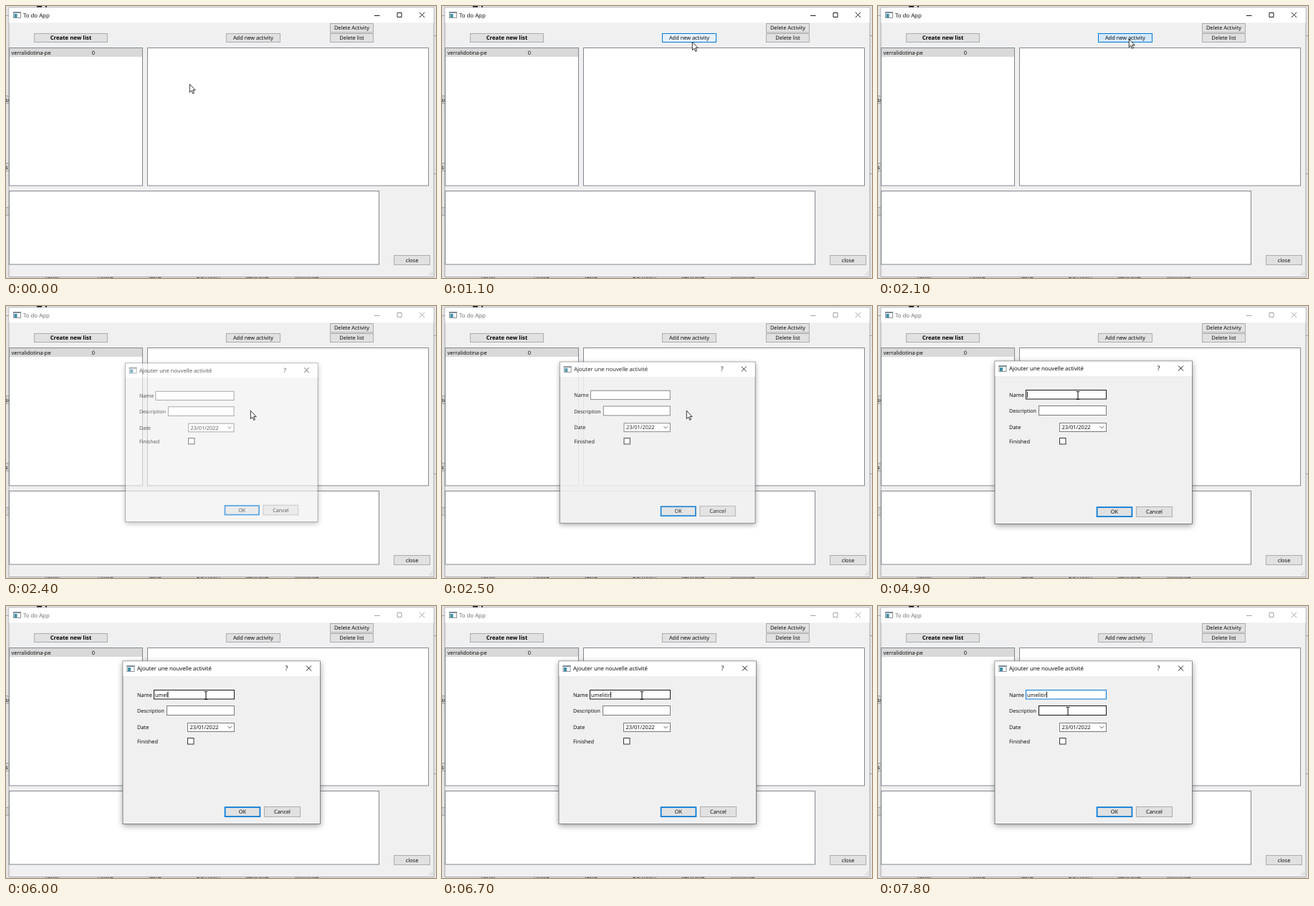
Write an HTML page that moves like this. It is 600 by 380 pixels and loops after 8 s.

```html
<!DOCTYPE html>
<html lang="fr">
<head>
<meta charset="utf-8">
<title>To do App</title>
<style>
  html, body { margin: 0; width: 100%; height: 100%; overflow: hidden; background: #e4e4e4; }
  svg { display: block; width: 600px; height: 380px; }
  text { font-family: "Open Sans", "Noto Sans", sans-serif; text-rendering: geometricPrecision; white-space: pre; }
</style>
</head>
<body>
<svg id="stage" viewBox="0 0 600 380" xmlns="http://www.w3.org/2000/svg"></svg>
<script>
const LOOP = 8000, STEP = 100;
const TYPED = "umelitir";
const KEY_TIMES = [5000, 5300, 5400, 6000, 6100, 6200, 6300, 6700];

// [time, x, y] of the pointer, linear in between
const POINTER = [
  [400, 256, 109], [800, 349, 53], [1000, 349, 53], [1100, 349, 50],
  [1500, 349, 50], [1600, 350, 46], [2100, 350, 46], [2300, 341, 146],
  [2800, 341, 146], [3100, 279, 132], [3200, 279, 132], [3300, 279, 125],
  [7600, 279, 125], [7700, 272, 134], [7800, 265, 147]
];
// [time, opacity, scale] of the opening dialog
const OPENING = [[2200, 0, .93], [2300, .3, .955], [2400, .65, .975], [2500, .88, .99], [2600, 1, 1]];

const rect = (x, y, w, h, fill, extra = "") =>
  `<rect x="${x}" y="${y}" width="${w}" height="${h}" fill="${fill}" ${extra}/>`;
const box = (x, y, w, h, fill, stroke, id = "") =>
  rect(x, y, w, h, fill, `stroke="${stroke}" ${id && `id="${id}"`}`);
const label = (x, y, str, size = 7.45, extra = "") =>
  `<text x="${x}" y="${y}" font-size="${size}" ${extra}>${str}</text>`;
const line = (d, stroke, width = 1, extra = "") =>
  `<path d="${d}" fill="none" stroke="${stroke}" stroke-width="${width}" ${extra}/>`;
const button = (x, y, w, h, str, { id = "", size = 7.45, extra = "" } = {}) =>
  box(x, y, w, h, "#e1e1e1", "#adadad", id) +
  label(x + w / 2, y + h / 2 + 2.6, str, size, `text-anchor="middle" ${extra}`);
const pane = (x, y, w, h) => box(x, y, w, h, "#fff", "#828790");
const cross = (x, y) => `M${x} ${y}l7 7m0 -7l-7 7`;
const windowIcon = (x, y) =>
  box(x + .5, y + .5, 10, 8, "#fafafa", "#8d959b") +
  rect(x, y, 11, 2, "#7d8b96") + rect(x + 1.5, y + 3, 4, 5, "#3c8fa8");

function backdrop() {
  const headings = [["(Nom", 55], ["Utilisé", 128], ["Texte", 198], ["Raccourci", 266], ["Vérifiable", 334], ["Info-bulle", 403]];
  return rect(0, 0, 600, 380, "#e4e4e4") +
    rect(43, 0, 7, 2, "#222") + rect(55, 0, 2, 3, "#222") +
    [125, 219, 281].map(y => rect(0, y, 4, 11, "#d2d2d2") + line(`M0 ${y + .5}h4m-4 11h4`, "#a5a5a5")).join("") +
    label(-1, 134, "se") + label(-1, 228, "s") +
    line("M0 13.5h4M597 41.5h3M597 234.5h3", "#a0a0a0") +
    headings.map(([str, x]) => label(x, 382.4, str)).join("");
}

function mainWindow() {
  const grip = [[0, 4], [2, 2], [2, 4], [4, 0], [4, 2], [4, 4]]
    .map(([x, y]) => rect(590 + x, 371 + y, 1, 1, "#b5b5b5")).join("");
  return rect(4, 2, 593, 376.5, "#f0f0f0", 'stroke="#999" stroke-width=".8"') +
    rect(4.4, 2.4, 592.2, 21, "#fff") + windowIcon(10, 8) +
    `<g id="titleText">${label(24, 15.8, "To do App", 7.85)}</g>` +
    line("M514 13.5h7.5M546 9.5h6v6h-6z" + cross(577, 9), "#000", .9, 'id="controls"') +
    button(39.5, 38.5, 102, 12, "Create new list", { size: 7.75, extra: 'font-weight="700"' }) +
    button(307.5, 38.5, 75, 12, "Add new activity", { id: "add" }) +
    button(452.5, 24.5, 60, 12.5, "Delete Activity") +
    button(452.5, 38.5, 60, 12, "Delete list") +
    pane(4.5, 58.5, 186, 192.5) + pane(197.5, 58.5, 392, 192.5) + pane(4.5, 258.5, 516, 102.5) +
    rect(5, 59, 185, 12, "#d9d9d9") +
    label(7.5, 67.7, "verralidotina-pe") + label(119.7, 67.7, "0") +
    button(541.5, 348.5, 50, 13, "close") + grip;
}

function dialog() {
  return rect(163, 77, 276, 228, "#000", 'opacity=".38" filter="url(#soft)"') +
    rect(163, 77, 275.5, 227.5, "#f0f0f0", 'stroke="#777" stroke-width=".9"') +
    rect(163.4, 77.4, 274.7, 20.6, "#fff") + windowIcon(168.5, 83) +
    label(183, 90, "Ajouter une nouvelle activité", 7.85) +
    label(391.5, 90.2, "?", 9, 'text-anchor="middle"') +
    line(cross(419, 83.5), "#000", .9) +
    label(183, 126.8, "Name") + label(183, 149.4, "Description", 7.1) +
    label(183, 172.2, "Date") + label(183, 192, "Finished") +
    box(206.5, 117.5, 112, 12.5, "#fff", "#7a7a7a", "nameField") +
    box(224.5, 139.5, 94, 13, "#fff", "#7a7a7a", "descField") +
    box(253.5, 163.5, 65, 12, "#fff", "#7a7a7a") +
    label(256.5, 172.2, "23/01/2022", 7.55) + line("M309.5 168l2.7 2.7l2.7 -2.7", "#444", .9) +
    box(253.5, 184.5, 8.5, 8.5, "#fff", "#333") +
    label(208, 126.8, "", 7.45, 'id="nameText"') + rect(208, 119.5, .9, 8.5, "#000", 'id="caret"') +
    button(305.5, 281.2, 49, 13, "OK") +
    rect(305.6, 281.2, 48.8, 13, "none", 'stroke="#0078d7" stroke-width="1.7"') +
    button(360.5, 280.5, 50, 14, "Cancel");
}

const stage = document.getElementById("stage");
stage.innerHTML =
  '<defs><filter id="soft" x="-10%" y="-10%" width="120%" height="125%"><feOffset dy="2"/><feGaussianBlur stdDeviation="4"/></filter></defs>' +
  backdrop() + mainWindow() + `<g id="dialog">${dialog()}</g>` +
  '<path id="arrow" d="M.3 .3v11.4l2.6 -2.5l1.8 4.2l1.8 -.8l-1.8 -4h3.5z" fill="#fff" stroke="#000" stroke-width=".8"/>' +
  line("M-2.2 -5.5h1.6l.6 .6l.6 -.6h1.6M0 -5v10M-2.2 5.5h1.6l.6 -.6l.6 .6h1.6", "#000", 1, 'id="beam"');

const el = id => document.getElementById(id);
const set = (id, attrs) => Object.entries(attrs).forEach(([k, v]) => el(id).setAttribute(k, v));
const show = (id, on) => set(id, { visibility: on ? "visible" : "hidden" });

function tween(keys, t) {
  const next = keys.findIndex(k => k[0] > t);
  if (next === 0) return keys[0].slice(1);
  if (next < 0) return keys[keys.length - 1].slice(1);
  const a = keys[next - 1], b = keys[next], p = (t - a[0]) / (b[0] - a[0]);
  return a.slice(1).map((v, i) => v + (b[i + 1] - v) * p);
}

function addButtonColors(t) {
  if (t < 1100 || t >= 2300) return ["#e1e1e1", "#adadad"];
  if (t < 1600) return ["#e5f1fb", "#0078d7"];
  if (t < 2000) return ["#cce4f7", "#005499"];
  return ["#d3e8f8", "#0078d7"];
}

function nameBorder(t) {
  if (t < 3300) return "#7a7a7a";
  if (t < 3400) return "#555";
  return t < 7700 ? "#171717" : "#0078d7";
}

function render(t) {
  const [fill, stroke] = addButtonColors(t);
  set("add", { fill, stroke });

  const active = t < 2200;
  set("titleText", { fill: active ? "#000" : "#666" });
  set("controls", { stroke: active ? "#000" : "#999" });

  const [opacity, scale] = tween(OPENING, t);
  set("dialog", { opacity, transform: `translate(300.7 190.5) scale(${scale}) translate(-300.7 -190.5)` });
  set("nameField", { stroke: nameBorder(t) });
  set("descField", { stroke: t >= 7800 ? "#171717" : "#7a7a7a" });

  const name = el("nameText");
  name.textContent = TYPED.slice(0, KEY_TIMES.filter(k => k <= t).length);
  set("caret", { x: 208 + (name.textContent ? name.getComputedTextLength() : 0) });
  show("caret", (t >= 3800 && t < 4300) || t >= 4900);

  const [x, y] = tween(POINTER, t);
  const overField = (t >= 3300 && t < 7700) || t >= 7800;
  for (const id of ["arrow", "beam"]) set(id, { transform: `translate(${x} ${y})` });
  show("arrow", !overField);
  show("beam", overField);
}

const start = performance.now();
function tick() {
  const t = (performance.now() - start) % LOOP;
  render(Math.floor(t / STEP) * STEP);
  requestAnimationFrame(tick);
}
tick();
</script>
</body>
</html>
```
